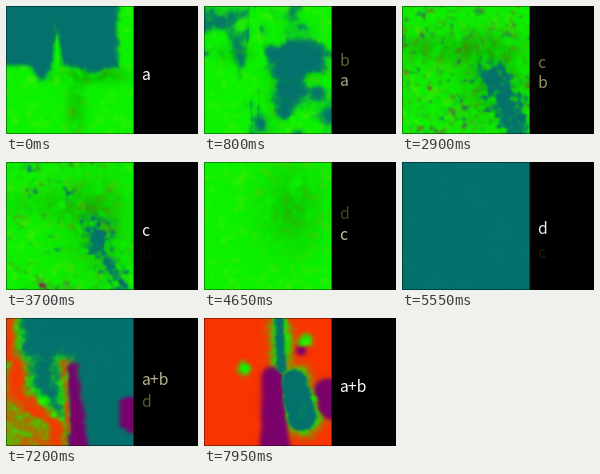
Animation of 192x128 px, one loop 8 s. Source, as a matplotlib script:

```python
import numpy as np
import matplotlib.pyplot as plt
from matplotlib.animation import FuncAnimation

W, H, N = 192, 128, 128
FRAMES, STEP = 160, 50
G, T, R, P = range(4)
COLORS = np.array([(12, 242, 0), (4, 113, 109), (250, 52, 0), (122, 0, 108)]) / 255
FAR = 12.0
yy, xx = np.mgrid[0:N, 0:N] + 0.5
axis = np.arange(N) + 0.5
rng = np.random.default_rng(7)


def smooth(u):
    u = np.clip(u, 0, 1)
    return u * u * (3 - 2 * u)


def bump(v, center, width):
    return np.exp(-((v - center) / width) ** 2)


def noise(count, sigma):
    """Smooth random fields with unit variance."""
    f = np.fft.fftfreq(N)
    k = np.exp(-2 * (np.pi * sigma) ** 2 * (f[:, None] ** 2 + f ** 2))
    n = np.fft.ifft2(np.fft.fft2(rng.normal(size=(count, N, N))) * k).real
    return n / n.std(axis=(1, 2), keepdims=True)


def below(edge):
    """Approximate distance below a curve y = edge(x)."""
    return (yy - edge) / np.hypot(1, np.gradient(edge))


def capsule(x0, y0, x1, y1, r0, r1=None):
    """Signed distance to a thick line, positive inside."""
    dx, dy = x1 - x0, y1 - y0
    u = np.clip(((xx - x0) * dx + (yy - y0) * dy) / (dx * dx + dy * dy), 0, 1)
    r = r0 + ((r0 if r1 is None else r1) - r0) * u
    return r - np.hypot(xx - x0 - u * dx, yy - y0 - u * dy)


def disc(x, y, r):
    return r - np.hypot(xx - x, yy - y)


def rim(field):
    """Score of a thin band along the border of a shape."""
    return 0.5 * field + 1.5


def patch(x, y, rx, ry, depth):
    return depth * bump(xx, x, rx) * bump(yy, y, ry)


def scores(base, *shapes):
    s = np.full((4, N, N), -FAR)
    s[base] = 0
    for cls, field in shapes:
        s[cls] = np.maximum(s[cls], np.clip(field, -FAR, FAR))
    return s


coast = 60 + 14 * bump(axis, 35, 9) - 32 * bump(axis, 51, 4) + 6 * bump(axis, 88, 14)
slope = 36 + 92 * np.clip((128 - axis) / 96, 0, 1.3) ** 3
shore = 13 + 9 * smooth((axis - 30) / 15) + 40 * smooth((axis - 65) / 45)
land = np.maximum(-below(shore).T, capsule(58, 46, 62, 112, 5))
tower = np.maximum(capsule(75, 3, 77, 50, 6), capsule(90, 65, 98, 98, 14, 16))
still = np.zeros((N, N))

# time, class scores, dark patches, roughness
KEYS = [
    (0, scores(G, (T, np.minimum(-below(coast), 112 - xx))),
     patch(92, 70, 30, 8, .2) + patch(70, 100, 10, 34, .14), .4),
    (1600, scores(G, (T, below(slope)), (G, disc(123, 77, 6))),
     patch(33, 49, 17, 9, .3), .4),
    (2900, scores(G, (T, capsule(91, 70, 116, 124, 13))),
     patch(45, 42, 60, 15, .16) + patch(92, 75, 34, 40, .18), 3.2),
    (4650, scores(G), patch(88, 45, 32, 45, .15), 1),
    (5550, scores(T), still, .4),
    (7200, scores(T, (R, land), (G, rim(land)),
                  (G, disc(36, 84, 8)), (G, disc(47, 98, 7)),
                  (P, 3 + capsule(65, 50, 73, 135, 4, 8)),
                  (P, capsule(124, 88, 124, 104, 10))), still, .6),
    (7950, scores(R, (T, 2 * tower), (G, rim(tower)),
                  (G, disc(40, 51, 6)), (G, disc(101, 23, 6)), (P, disc(97, 33, 5)),
                  (P, 3 + capsule(69, 60, 72, 140, 9, 12)),
                  (P, 3 + capsule(123, 74, 127, 88, 10))), still, .6),
]
TIMES = [k[0] for k in KEYS]
coarse = noise(8, 6).reshape(2, 4, N, N)
fine = noise(4, 1.8).reshape(2, 2, N, N)
mottle = noise(2, 2.5)
vignette = np.ones((N, N, 1))
vignette[[0, -1]] = vignette[:, [0, -1]] = .6


def turn(pair, angle):
    return pair[0] * np.cos(angle) + pair[1] * np.sin(angle)


def picture(t):
    i = min(np.searchsorted(TIMES, t, side="right"), len(KEYS) - 1) - 1
    (t0, s0, d0, r0), (t1, s1, d1, r1) = KEYS[i], KEYS[i + 1]
    u = (t - t0) / (t1 - t0)
    angle = 4 * np.pi * t / (FRAMES * STEP)
    rough = r0 + (r1 - r0) * u
    s = s0 + (s1 - s0) * u + (.4 + 6 * u * (1 - u)) * turn(coarse, angle)
    s[:2] += rough * turn(fine, angle)
    e = np.exp((s - s.max(axis=0)) / (1 + .6 * rough))
    e /= e.sum(axis=0)
    rgb = np.tensordot(e, COLORS, axes=(0, 0))
    grain = turn(mottle, angle)
    dark = (d0 + (d1 - d0) * u) * (1 + .3 * grain)
    rgb *= 1 - (dark * e[G])[..., None]
    rgb[..., 0] += .05 * np.maximum(grain, 0) * e[G]
    return np.clip(rgb * vignette, 0, 1)


LABELS = ["a", "b", "c", "d", "a+b"]
HOLD, MOVE, BASE, GAP = 2000, 1850, 74, 24

fig = plt.figure(figsize=(W / 100, H / 100), dpi=100, facecolor="black")
ax = fig.add_axes([0, 0, 1, 1])
ax.axis("off")
image = ax.imshow(picture(0), extent=(0, N, N, 0), interpolation="nearest")
ax.set_xlim(0, W)
ax.set_ylim(H, 0)
ax.set_aspect("auto")
style = dict(family="Noto Sans CJK JP", fontsize=15.7 * .72, va="baseline", ha="left")
old, new = (ax.text(135.4, BASE, "", **style) for _ in range(2))


def show(label, text, y, v):
    label.set_text(text if v > .03 else "")
    label.set_y(y)
    label.set_color((v, v * (.95 + .05 * v), v ** 1.7))


def update(n):
    t = n * STEP
    k = t // HOLD
    p = float(smooth((t % HOLD) / MOVE))
    image.set_data(picture(t))
    show(old, LABELS[k], BASE + GAP * p ** 1.5, (1 - p) ** .8)
    show(new, LABELS[k + 1], BASE - GAP * (1 - p), p)
    return image, old, new


anim = FuncAnimation(fig, update, frames=FRAMES, interval=STEP, repeat=True,
                     repeat_delay=0, blit=False)
plt.show()
```
